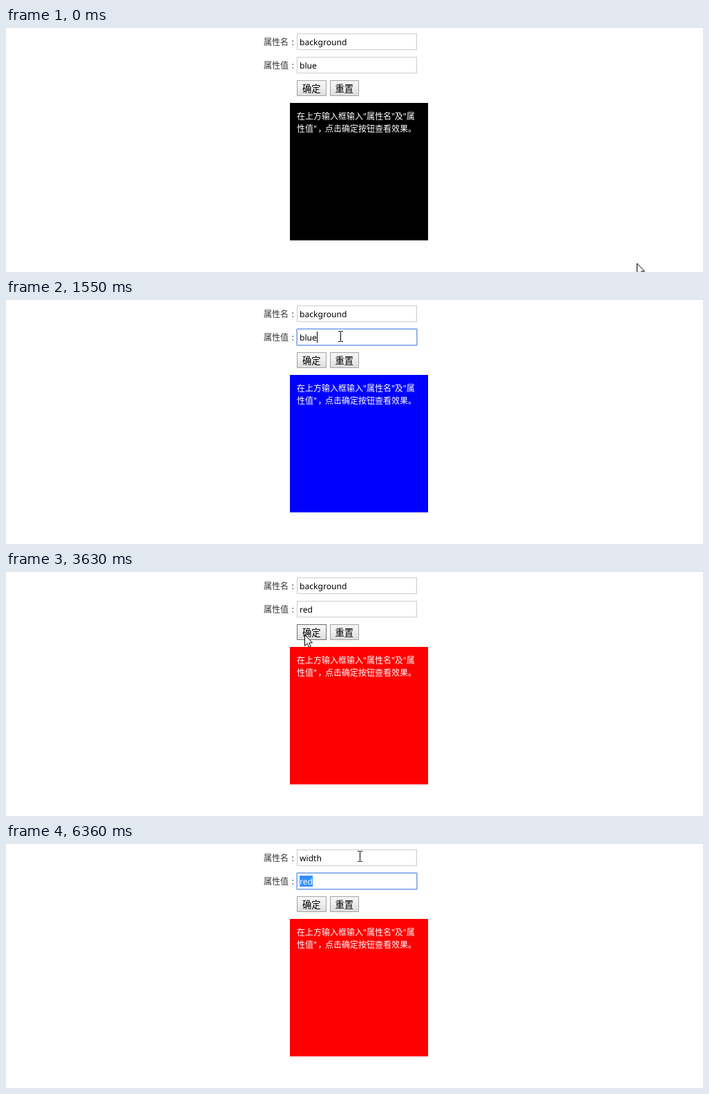
An HTML page that plays this animation: 1009x355 px, repeating every 8000 ms.

```html
<!DOCTYPE html>
<html lang="zh-CN">
<head>
<meta charset="utf-8">
<title>属性设置</title>
<style>
  html, body { margin: 0; width: 100%; height: 100%; overflow: hidden; background: #fff; }
  svg { display: block; width: 100%; height: 100%; }
  text { font: 12px "Noto Sans", "Noto Sans CJK SC", sans-serif; white-space: pre; }
  .label { fill: #333; }
  .typed { font-size: 12.1px; text-rendering: geometricPrecision; }
  .button text { font-size: 13.33px; }
  .note { fill: #fff; }
  rect { shape-rendering: crispEdges; }
  .ring { shape-rendering: auto; fill: none; stroke: #a9c5f3; }
</style>
</head>
<body>
<svg id="stage" viewBox="0 0 1009 355" xmlns="http://www.w3.org/2000/svg">
  <defs>
    <linearGradient id="face" x1="0" y1="0" x2="0" y2="1">
      <stop offset="0" stop-color="#f6f6f6"/>
      <stop offset=".4" stop-color="#f0f0f0"/>
      <stop offset="1" stop-color="#dcdcdc"/>
    </linearGradient>
  </defs>
  <g id="fields"></g>
  <g class="button" id="ok">
    <rect x="421.5" y="76.5" width="42" height="22" fill="url(#face)" stroke="#a5a5a5"/>
    <text x="429" y="93">确定</text>
  </g>
  <g class="button">
    <rect x="469.5" y="76.5" width="41" height="22" fill="url(#face)" stroke="#a5a5a5"/>
    <text x="476.5" y="93">重置</text>
  </g>
  <rect id="box" x="411" y="109" width="200" height="200"/>
  <text class="note" x="421" y="133">在上方输入框输入"属性名"及"属</text>
  <text class="note" x="421" y="151">性值"<tspan dx="1.5">，</tspan><tspan dx="-1.5">点击确定按钮查看效果。</tspan></text>
  <circle id="halo" r="29.3" fill="#ff0" fill-opacity=".5"/>
  <path id="arrow" d="M.5 .5V16.5L4.2 13L6.8 18.7L9.2 17.6L6.7 12H11.6Z" fill="#fff" stroke="#000"/>
  <path id="beam" d="M-3 -7.5H0M1 -7.5H4M.5 -7V7M-3 7.5H0M1 7.5H4" fill="none" stroke="#000" shape-rendering="crispEdges"/>
</svg>
<script>
const LOOP = 8000;
const $ = id => document.getElementById(id);

// Each track lists [start time, value]; a value holds until the next start.
const typed = [
  [[0, "background"], [5190, "w"], [5340, "wi"], [5410, "wid"], [5660, "widt"], [5740, "width"]],
  [[0, "blue"], [1850, "r"], [1950, "re"], [2170, "red"]]
];
const focus = [[0, -1], [1450, 1], [3480, -1], [4420, 0], [6360, 1]];
const selected = [[0, false], [1650, true], [1850, false], [4570, true], [5190, false], [6360, true]];
const caretOn = [[0, true], [2640, false], [3170, true], [6190, false]];
const boxColor = [[0, "#000"], [930, "#00f"], [3630, "#f00"]];
const clicks = [[850, 930], [1450, 1550], [1650, 1700], [3480, 3630], [4420, 4490], [4570, 4650]];

const home = [913, 342];
const moves = [
  { start: 70, steps: 9, gap: 78.75, to: [446, 86] },
  { start: 1150, steps: 4, gap: 76, to: [484, 53] },
  { start: 2940, steps: 7, gap: 77, to: [432, 91] },
  { start: 3700, steps: 9, gap: 80, to: [512, 18] }
];

const at = (track, t) => track.reduce((v, [start, next]) => t >= start ? next : v, track[0][1]);
const inside = ([x, y], l, t, r, b) => x >= l && x < r && y >= t && y < b;
const show = (el, on) => el.setAttribute("visibility", on ? "visible" : "hidden");

function make(parent, tag, attrs) {
  const el = document.createElementNS("http://www.w3.org/2000/svg", tag);
  for (const key in attrs) el.setAttribute(key, attrs[key]);
  return parent.appendChild(el);
}

function makeField(name, top) {
  const g = $("fields");
  const label = make(g, "text", { class: "label", x: 373, y: top + 17 });
  label.textContent = name;
  make(g, "text", { class: "label", x: 413.4, y: top + 17 }).textContent = ":";
  return {
    ring: make(g, "rect", { class: "ring", x: 420.5, y: top - .5, width: 175, height: 25, rx: 1.5 }),
    frame: make(g, "rect", { x: 421.5, y: top + .5, width: 173, height: 23, fill: "#fff" }),
    mark: make(g, "rect", { x: 425, y: top + 4, height: 16, fill: "#3390ff" }),
    text: make(g, "text", { class: "typed", x: 425, y: top + 17 }),
    caret: make(g, "rect", { y: top + 4, width: 1, height: 16 })
  };
}
const fields = [makeField("属性名", 8), makeField("属性值", 42)];

function pointerAt(t) {
  let pos = home;
  for (const { start, steps, gap, to } of moves) {
    if (t < start) break;
    const p = Math.min(steps, Math.floor((t - start) / gap + 1e-6) + 1) / steps;
    const e = p * p * (3 - 2 * p);
    pos = pos.map((v, i) => Math.round(v + (to[i] - v) * e));
  }
  return pos;
}

function drawField(f, i, t) {
  const active = at(focus, t) === i;
  const marked = active && at(selected, t);
  const value = at(typed[i], t);
  if (f.text.textContent !== value) f.text.textContent = value;
  const width = Math.round(f.text.getComputedTextLength());
  f.text.setAttribute("fill", marked ? "#fff" : "#000");
  f.frame.setAttribute("stroke", active ? "#7ba5e9" : "#ccc");
  f.mark.setAttribute("width", width);
  f.caret.setAttribute("x", 425 + width);
  show(f.ring, active);
  show(f.mark, marked);
  show(f.caret, active && !marked && at(caretOn, t));
}

function draw(t) {
  fields.forEach((f, i) => drawField(f, i, t));
  $("box").setAttribute("fill", at(boxColor, t));

  const pos = pointerAt(t);
  const overField = inside(pos, 421, 8, 595, 32) || inside(pos, 421, 42, 595, 66);
  const overOk = inside(pos, 421, 76, 464, 99);
  $("ok").firstElementChild.setAttribute("stroke", overOk ? "#707070" : "#a5a5a5");

  const place = `translate(${pos})`;
  $("arrow").setAttribute("transform", place);
  $("beam").setAttribute("transform", place);
  show($("arrow"), !overField);
  show($("beam"), overField);

  const shift = overField ? 0 : 9;
  $("halo").setAttribute("cx", pos[0] + shift + .5);
  $("halo").setAttribute("cy", pos[1] + shift);
  show($("halo"), clicks.some(([a, b]) => t >= a && t < b));
}

const begin = performance.now();
function tick() {
  draw((performance.now() - begin) % LOOP);
  requestAnimationFrame(tick);
}
tick();
</script>
</body>
</html>
```
